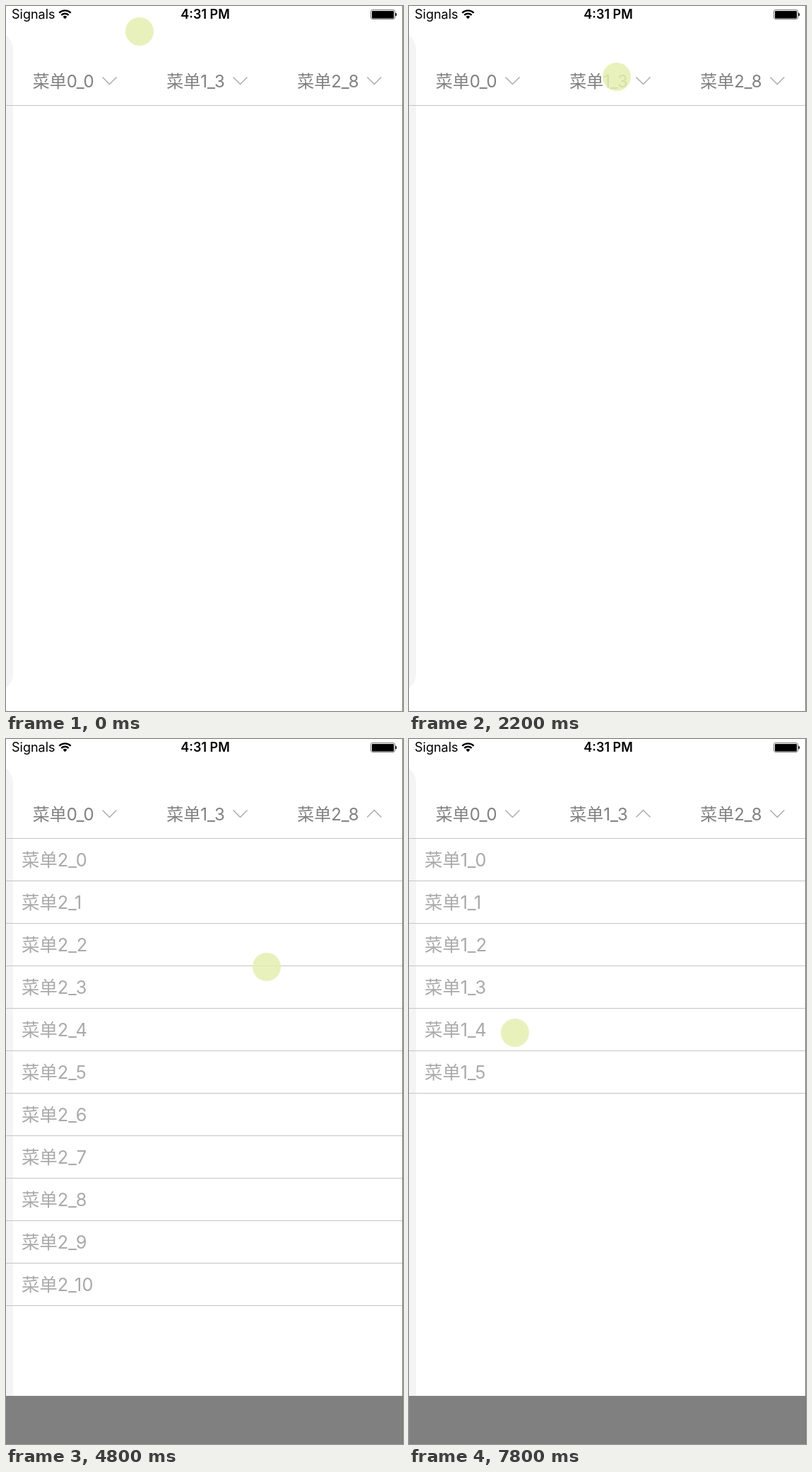
An HTML page for the animation above (8 s loop, 562 by 996 pixels).

```html
<!DOCTYPE html>
<html lang="zh-CN">
<head>
<meta charset="utf-8">
<title>Dropdown menu</title>
<style>
  html, body { margin: 0; width: 100%; height: 100%; overflow: hidden; background: #fff; }
  svg { display: block; width: 100%; height: 100%; }
  text { font-family: Inter, "Noto Sans CJK SC", "Noto Sans CJK", sans-serif; }
  .title { font-size: 24px; fill: #808080; text-anchor: middle; }
  .row { font-size: 25.4px; fill: #aaa; }
  .status { font-size: 18px; }
  .line { stroke: #c4c4c4; }
  .chevron { fill: none; stroke: #aaa; stroke-width: 1.4; }
  .panel { fill: #f4f4f4; }
  .wifi { fill: none; stroke: #000; stroke-width: 2.3; }
</style>
</head>
<body>
<svg viewBox="0 0 562 996">
  <defs>
    <clipPath id="tableClip"><rect id="tableArea" y="140" width="562" height="0"/></clipPath>
    <rect id="panel" class="panel" x="-42" y="36" width="52" height="933" rx="26"/>
  </defs>
  <rect width="562" height="996" fill="#fff"/>
  <use href="#panel"/>

  <text class="status" x="8" y="18">Signals</text>
  <g class="wifi">
    <path d="M75.3 9.8a11.6 11.6 0 0 1 16.4 0M78.3 12.9a7.4 7.4 0 0 1 10.4 0"/>
    <path d="M83.5 18.2l-2.9-3a4.1 4.1 0 0 1 5.8 0z" fill="#000" stroke="none"/>
  </g>
  <text class="status" x="282" y="18" text-anchor="middle" font-weight="600" font-size="18">4:31 PM</text>
  <rect x="516.5" y="5.5" width="34" height="13" rx="2.5" fill="#fff" stroke="#777"/>
  <rect x="518" y="7" width="31" height="10.5" rx="1"/>
  <path d="M551.3 9.5q1.8 0 1.8 2.5t-1.8 2.5z"/>

  <g id="header"></g>
  <rect id="dim" y="140" width="562" height="856" fill="#808080"/>
  <g clip-path="url(#tableClip)">
    <rect y="140" width="562" height="788" fill="#fff"/>
    <use href="#panel"/>
    <g id="lists"></g>
  </g>
  <path class="line" d="M0 140.5H562"/>
  <path d="M561.5 0V996" stroke="#777"/>
  <circle id="touch" r="20" fill="#e4efb1" opacity=".85"/>
</svg>
<script>
const LOOP = 8000, STEP = 200, TABLE_HEIGHT = 788, ROW = 60, MENU_WIDTH = 562 / 3;
const $ = id => document.getElementById(id);
const clamp = v => Math.max(0, Math.min(1, v));
const ease = k => k * k * (3 - 2 * k);

// The touch rests at each stop; on leaving it may open a menu or close the open one.
const stops = [
  { arrive: 0, leave: 0, x: 189, y: 36 },
  { arrive: 400, leave: 600, x: 100, y: 106, opens: 0 },
  { arrive: 1400, leave: 1400, x: 165, y: 440 },
  { arrive: 1800, leave: 1800, x: 120, y: 170, closes: true },
  { arrive: 2200, leave: 2600, x: 294, y: 100, opens: 1 },
  { arrive: 3400, leave: 3800, x: 194, y: 344, closes: true },
  { arrive: 4400, leave: 4400, x: 465, y: 108, opens: 2 },
  { arrive: 4800, leave: 4800, x: 369, y: 322 },
  { arrive: 5600, leave: 6200, x: 265, y: 630, closes: true },
  { arrive: 6800, leave: 6800, x: 287, y: 50 },
  { arrive: 7200, leave: 7200, x: 286, y: 108, opens: 1 },
  { arrive: 7800, leave: LOOP, x: 150, y: 415 },
];

const sessions = stops.filter(s => "opens" in s).map(s => {
  const end = stops.find(e => e.closes && e.leave > s.leave);
  return { menu: s.opens, open: s.leave, close: end ? end.leave : Infinity };
});

const openness = (s, t) =>
  Math.min(clamp(.5 + (t - s.open) / 400), clamp(.5 - (t - s.close) / 400));

function touchAt(t) {
  const i = stops.findIndex(s => s.leave > t);
  const from = stops[i - 1], to = stops[i];
  const k = ease(clamp((t - from.leave) / (to.arrive - from.leave)));
  return [from.x + (to.x - from.x) * k, from.y + (to.y - from.y) * k];
}

const menus = [0, 3, 8].map((picked, m) => {
  const center = 81.2 + m * MENU_WIDTH;
  $("header").insertAdjacentHTML("beforeend",
    `<text id="title${m}" class="title" x="${center}" y="114.6">菜单${m}_${picked}</text>
     <path id="arrow${m}" class="chevron" d="M-10 -5L0 5L10 -5"/>`);
  let list = "";
  for (let r = 0; r <= m * 5; r++) {
    const y = 140 + r * ROW;
    list += `<text class="row" x="22" y="${y + 40}">菜单${m}_${r}</text>
      <path class="line" d="M0 ${y + ROW + .5}H562"/>`;
  }
  $("lists").insertAdjacentHTML("beforeend", `<g id="list${m}">${list}</g>`);
  const arrowX = center + $("title" + m).getComputedTextLength() / 2 + 21.8;
  return { arrow: $("arrow" + m), list: $("list" + m), arrowX };
});

function draw(t) {
  const active = sessions.find(s => openness(s, t) > 0);
  const amount = active ? openness(active, t) : 0;
  menus.forEach(({ arrow, list, arrowX }, m) => {
    const isActive = active && active.menu === m;
    const angle = isActive ? 180 * amount : 0;
    arrow.setAttribute("transform", `translate(${arrowX} 105.6) rotate(${angle})`);
    list.setAttribute("display", isActive ? "inline" : "none");
  });
  $("dim").setAttribute("opacity", amount);
  $("tableArea").setAttribute("height", TABLE_HEIGHT * amount);
  const [x, y] = touchAt(t);
  $("touch").setAttribute("cx", x);
  $("touch").setAttribute("cy", y);
}

const start = performance.now();
function tick() {
  const t = (performance.now() - start) % LOOP;
  draw(Math.floor(t / STEP) * STEP);
  requestAnimationFrame(tick);
}
tick();
</script>
</body>
</html>
```
